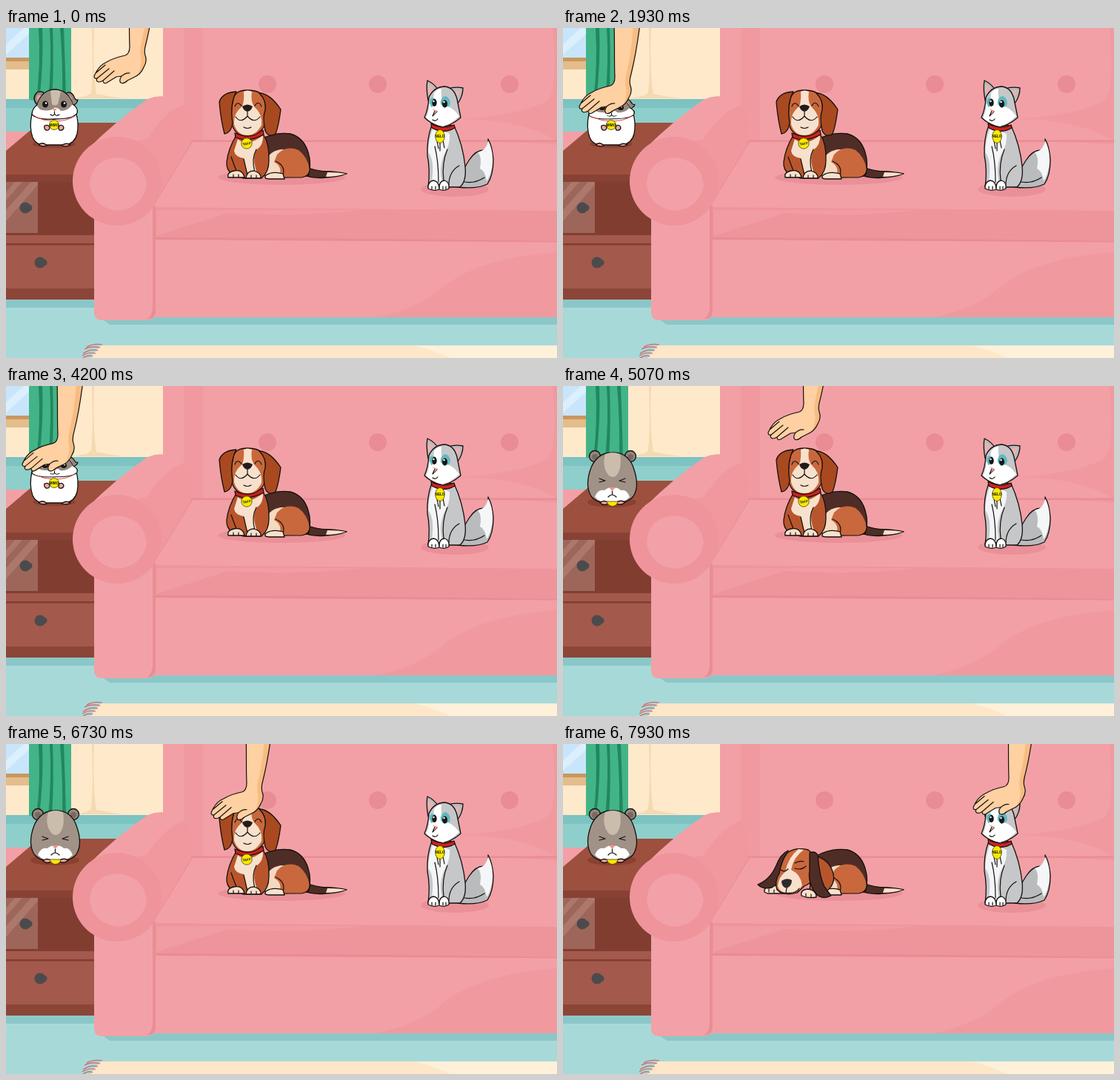
These frames come from a looping animation (744 by 446 pixels, 8000 ms). An HTML page:

```html
<!DOCTYPE html>
<html lang="en">
<head>
<meta charset="utf-8">
<title>Petting the pets</title>
<style>
  html, body { margin: 0; width: 100%; height: 100%; overflow: hidden; background: #f2a0a6; }
  svg { display: block; width: 744px; height: 446px; }
  .ink { stroke: #15100e; stroke-width: 1.3; stroke-linejoin: round; stroke-linecap: round; }
  .line { fill: none; stroke: #15100e; stroke-width: 1.2; stroke-linecap: round; stroke-linejoin: round; }
  .tag { fill: #f9e900; stroke: #4a4300; stroke-width: .8; }
  text { font: 700 4.6px "Liberation Sans", Arial, sans-serif; text-anchor: middle; fill: #111; }
  .off { display: none; }
</style>
</head>
<body>
<svg viewBox="0 0 744 446">
  <!-- wall, window, curtain -->
  <g id="room">
    <path fill="#ffe9cb" d="M0 0H230V100H0z"/>
    <path fill="#c9e5fb" d="M0 0H31V40H0z"/>
    <path fill="#dceffd" d="M0 22L24 0H31V8L0 36z"/>
    <path fill="#c8975f" d="M0 40H32V45H0z"/>
    <path fill="#e3bd8b" d="M0 45H32V56H0z"/>
    <path fill="#ffe9cb" d="M0 56H28V96H0z"/>
    <path fill="#f4d9b1" d="M116 0H119Q117 60 122 89Q140 93 160 95H88Q112 93 115 87Q118 60 116 0z"/>
    <path fill="#8ecfcb" d="M0 96H240V140H0z"/>
    <path fill="#7cc3c2" d="M0 96H240V108H0z"/>
    <path fill="#43b488" d="M31 0H88V97Q60 101 31 97z"/>
    <path fill="#21875f" d="M44 0H49Q51 45 45 98H41Q47 50 44 0zM59 0H63Q65 50 62 98H57Q62 45 59 0zM73 0H78Q80 50 81 98H76Q77 50 73 0z"/>
    <path fill="#a8d9d9" d="M0 366H744V446H0z"/>
    <path fill="#8bc7c8" d="M0 366H125V378H0zM125 390H744V401H140z"/>
    <path fill="#fde7c8" d="M128 429H744V446H114Q120 438 128 429z"/>
    <path fill="#fff0da" d="M552 429H744V446H600Q578 436 552 429z"/>
    <path fill="none" stroke="#d86462" stroke-width="1.2" d="M130 428Q118 426 109 431M127 432Q115 429 106 434M124 436Q114 433 104 440M121 440Q112 437 103 443M117 444Q111 441 104 446"/>
  </g>

  <!-- side table -->
  <g id="table">
    <path fill="#a3594b" d="M0 200H122V367H0z"/>
    <path fill="#9c503d" d="M45 128H152L110 207H0V166z"/>
    <path fill="#884235" d="M0 198H122V208H0z"/>
    <path fill="#813d30" d="M43 208H122V277H43z"/>
    <path fill="#9e665a" d="M0 208H43V277H0z"/>
    <path fill="#ac786c" d="M0 246L34 208H43V212L0 261zM0 222L12 208H22L0 233z"/>
    <path fill="#823e32" d="M0 277H122V280H0zM0 291H122V293.500H0z"/>
    <path fill="#8c4638" d="M0 352H122V367H0z"/>
    <g fill="#4b4b4d">
      <circle cx="26" cy="243" r="7.500"/><circle cx="31" cy="243" r="4.500"/>
      <circle cx="46" cy="317" r="7.500"/><circle cx="51" cy="317" r="4.500"/>
    </g>
  </g>

  <!-- sofa -->
  <g id="sofa">
    <path fill="#f2a0a6" d="M212 0H744V391H190V150H212z"/>
    <path fill="#f09a9f" d="M240 0H266V153H240z"/>
    <path fill="#f09a9f" d="M744 0H738Q746 92 728 100Q690 118 610 123Q700 124 744 153z"/>
    <path fill="#ea8d95" d="M250 151.500H744V154H252L207 228L200 238z"/>
    <path fill="#f2a0a6" d="M254 154H744V247L203 243z"/>
    <path fill="#ef999e" d="M744 158Q700 154 660 154H744z"/>
    <path fill="#ee959b" d="M202 242L744 247V288L202 284z"/>
    <path fill="#f09ca2" d="M203 281L300 250Q400 256 480 246H203z"/>
    <path fill="#e98b93" d="M202 283Q480 284 744 288V289.500Q480 288 202 286z"/>
    <path fill="#f09a9f" d="M744 303Q640 310 590 350Q560 378 500 391H744z"/>
    <g fill="#e98c94">
      <circle cx="353" cy="76" r="12"/><circle cx="502" cy="76" r="12"/><circle cx="680" cy="76" r="12"/>
    </g>
    <path fill="#f0989e" d="M104 172Q150 125 190 97Q205 90 222 94Q250 103 250 130V155L200 238z"/>
    <path fill="#f2a0a6" d="M110 164Q150 124 190 97Q205 90 222 94Q234 98 240 104Q215 112 190 150z"/>
    <path fill="#f2a1a8" d="M119 220H202V384Q202 394 190 395H130Q119 395 119 384z"/>
    <path fill="#ea8d95" d="M198 240H202V384Q201 394 190 393Q197 391 198 378z"/>
    <circle cx="150" cy="207" r="60" fill="#ef949b"/>
    <path fill="#f2a1a8" d="M113 213Q114 178 150 175Q186 178 190 212Q184 244 150 247Q118 242 113 213z"/>
  </g>

  <!-- hamster -->
  <g id="hamsterUp">
    <ellipse cx="65" cy="157" rx="29" ry="5" fill="#8c4030"/>
    <path class="ink" fill="#fff" d="M35 116Q31 134 36 148Q40 158 52 158H80Q93 156 96 143Q99 128 94 113z"/>
    <g id="hamsterHead">
      <path class="ink" fill="#95877c" d="M42 104Q34 95 42 87Q49 84 52 89zM80 89Q86 84 91 91Q94 99 97 97Q96 104 87 106z"/>
      <path fill="#d9a3a0" d="M43 99Q39 93 44 90Q48 90 48 93zM83 92Q87 89 89 96L86 100z"/>
      <path class="ink" fill="#fff" d="M42 104Q48 84 66 83Q84 84 90 103Q98 108 96 115Q91 123 67 123Q43 125 35 117Q35 109 42 104z"/>
      <path fill="#95877c" d="M42 105Q48 85 66 84Q84 85 90 103Q84 112 74 112Q70 107 65 108Q60 113 50 111Q45 111 42 105z"/>
      <path fill="#cbbdac" d="M60 85Q67 82 74 86L70 103Q66 106 62 103z"/>
      <ellipse cx="53" cy="103" rx="4" ry="4.500" fill="#1b1514"/><ellipse cx="78" cy="103" rx="4" ry="4.500" fill="#1b1514"/>
      <circle cx="54" cy="101.500" r="1.200" fill="#fff"/><circle cx="79" cy="101.500" r="1.200" fill="#fff"/>
      <path fill="#f2928d" d="M62 109H69L65.500 113z"/>
      <path class="line" d="M65.500 113V116M60 117Q64 120 65.500 116Q68 120 72 117"/>
    </g>
    <path fill="none" stroke="#e04a3d" d="M39 120Q52 126 65 126Q82 126 93 119"/>
    <circle class="tag" cx="65" cy="131" r="6.500"/>
    <text x="65" y="132.700">MIMO</text>
    <path class="ink" fill="#f3aaa0" stroke-width=".8" d="M52 132Q57 130 59 134Q59 139 54 138Q51 136 52 132zM72 132Q77 130 78 135Q77 139 72 138Q70 135 72 132z"/>
    <path class="ink" fill="#f3aaa0" d="M44 158Q50 153 55 159Q50 161 44 158zM75 159Q81 154 87 158Q82 161 75 159z"/>
  </g>
  <g id="hamsterDown" class="off">
    <ellipse cx="66" cy="157" rx="33" ry="7" fill="#8c4030"/>
    <circle class="ink" cx="43" cy="95" r="7.500" fill="#95877c"/><circle class="ink" cx="91" cy="95" r="7.500" fill="#95877c"/>
    <circle cx="43" cy="96" r="4" fill="#786a61"/><circle cx="91" cy="96" r="4" fill="#786a61"/>
    <path class="ink" fill="#a09287" d="M66 90Q87 89 95 110Q104 135 95 149Q87 159 66 159Q46 159 38 149Q29 134 38 110Q47 90 66 90z"/>
    <path fill="#cbbdac" d="M57 92Q67 88 77 92Q80 112 72 121Q67 125 62 121Q52 110 57 92z"/>
    <path fill="#fff" d="M43 150Q47 139 56 141Q63 135 67 139Q72 135 78 141Q86 139 90 150Q83 158 66 158Q50 158 43 150z"/>
    <path class="line" d="M49 125L57 128L49 130M84 125L76 128L84 130" stroke-width=".9"/>
    <path fill="#f2928d" d="M62 137H71L66.500 142z"/>
    <path class="line" d="M66.500 142V147M61 150Q66 144 72 150"/>
    <path class="ink" fill="#f3aaa0" d="M50 158Q55 153 62 158Q56 163 50 158zM71 158Q77 153 84 157Q78 163 71 158z"/>
    <path class="tag" d="M59 156H74Q73 162 66.500 162.500Q61 162 59 156z"/>
  </g>

  <!-- dog -->
  <g id="dog">
    <ellipse cx="372" cy="202" rx="86" ry="10" fill="#ea9098"/>
    <path class="ink" fill="#4f2d27" d="M404 187Q418 194 438 194Q451 195 460 197Q447 202 432 202Q414 204 400 198z"/>
    <path fill="#f8e1cc" d="M434 195Q450 195 459 197Q446 201 432 201z"/>
    <path class="ink" fill="#4f2d27" d="M340 152Q363 140 384 143Q402 148 408 168Q413 184 408 200L352 203Q338 180 340 152z"/>
    <path fill="#f5d9c0" d="M348 182Q358 163 376 164L372 201L350 202z"/>
    <path fill="#c9683c" d="M366 171Q378 158 395 165Q407 174 410 191Q408 202 396 202L368 203Q375 188 362 181z"/>
    <path class="line" d="M364 180Q378 186 374 200M410 187Q412 200 399 202H355"/>
    <path class="ink" fill="#f8e1cc" d="M374 197Q360 193 351 199Q347 204 356 204H376z"/>
    <g id="dogUp">
      <path class="ink" fill="#b9552c" d="M311 145Q300 163 298 181Q297 192 306 198L320 203H345Q355 195 355 179Q356 157 347 143z"/>
      <path fill="#f8e1cc" d="M313 150Q326 162 347 145Q348 158 338 165Q331 178 341 201H327L321 176Q309 174 308 166z"/>
      <path class="line" d="M304 174Q308 186 312 195M321 177L326 199M338 164Q331 177 336 195"/>
      <path class="ink" fill="#f8e1cc" d="M300 202Q298 195 308 193Q320 191 322 202zM324 203Q325 193 335 193Q345 196 344 203z"/>
      <path class="line" d="M307 198V202M314 198V202M331 199V203M338 199V203" stroke-width=".8"/>
      <path class="ink" fill="#c9211e" d="M309 142Q326 150 347 138L348 144Q328 155 310 148z"/>
      <path class="ink" fill="#c9683c" d="M307 96Q309 84 326 84Q344 84 349 95Q353 116 348 134Q339 147 325 146Q311 146 306 133Q302 116 307 96z"/>
      <path fill="#f8e1cc" d="M321 86Q326 83 332 86Q330 99 335 106Q347 117 345 131Q338 145 325 145Q312 144 308 130Q307 115 319 106Q322 98 321 86z"/>
      <path class="ink" fill="#a9491f" d="M311 86Q292 87 288 100Q290 124 295 143Q304 142 306 128Q302 102 311 86zM342 88Q356 88 371 110Q368 133 364 143Q355 149 350 139Q346 120 350 111Q352 98 342 88z"/>
      <path class="line" d="M309 106Q312 98 318 105M336 105Q341 97 345 106" stroke-width="1.600"/>
      <path fill="#241b1b" d="M319 106Q326 101 333 106Q331 112 326 113Q321 112 319 106z"/>
      <path class="line" d="M326 113V119M310 120Q317 130 326 119Q335 130 343 120" stroke-width="1.700"/>
      <path class="line" d="M321 134Q326 137 331 134" stroke-width=".8"/>
      <circle class="tag" cx="325" cy="156" r="7.200"/>
      <text x="325" y="158" transform="rotate(-8 325 156)">TAFF</text>
    </g>
    <g id="dogDown" class="off">
      <path class="ink" fill="#b9552c" d="M336 150Q358 154 364 172Q370 190 353 201L333 202z"/>
      <path class="ink" fill="#f8e1cc" d="M272 200Q271 192 283 190L300 193V202H276z"/>
      <path class="ink" fill="#4f2d27" d="M304 144Q294 148 288 164Q280 183 263 190Q270 197 282 194Q297 186 301 170z"/>
      <path class="ink" fill="#c9683c" d="M303 147Q314 139 331 143Q342 151 341 169Q340 187 326 192L316 201Q300 206 289 197Q285 187 292 175Q295 157 303 147z"/>
      <path fill="#f8e1cc" d="M318 142L325 143Q311 153 308 170Q321 176 323 191Q318 201 305 202Q292 201 290 192Q291 180 300 173Q304 153 318 142z"/>
      <path class="line" d="M294 170Q299 174 304 169M313 168Q322 171 328 165M313 161Q320 157 325 159" stroke-width="1.500"/>
      <path fill="#30292b" d="M295 185Q302 180 309 184Q309 192 302 195Q295 193 295 185z"/>
      <path class="line" d="M302 195L301 201M289 196Q293 203 301 201Q314 203 319 195"/>
      <path class="ink" fill="#f8e1cc" d="M322 205Q320 197 331 196Q343 198 342 207Q331 209 322 205z"/>
      <path class="line" d="M328 202V206M335 203V207M278 196V200M285 197V201" stroke-width=".8"/>
      <path class="ink" fill="#4f2d27" d="M333 147Q340 144 344 150Q346 178 353 193Q359 201 362 205Q351 211 342 203Q330 187 333 171z"/>
    </g>
  </g>

  <!-- cat -->
  <g id="cat">
    <ellipse cx="606" cy="218" rx="46" ry="10" fill="#ea9098"/>
    <path class="ink" fill="#b9bbbd" d="M608 213Q616 193 625 179Q634 165 645 165Q652 160 651 150Q657 161 658 178Q658 199 650 211Q635 218 610 215z"/>
    <path fill="#f5f6f7" d="M651 152Q658 166 657 183Q654 201 649 207Q647 193 640 190Q643 174 637 168Q648 166 651 152z"/>
    <path class="line" d="M615 207Q631 212 646 202"/>
    <path class="ink" fill="#c5c7c9" d="M575 131Q568 150 569 172Q573 192 570 215H613Q622 207 620 187Q617 158 605 132z"/>
    <path fill="#f4f5f6" d="M577 134Q570 153 570 168Q579 178 575 207L590 213Q583 190 592 170Q600 158 599 143z"/>
    <path class="line" d="M579 160Q584 180 584 208M596 164Q588 183 591 207M612 186Q598 194 598 212M582 153L584 163M586 155V166M590 152L592 162"/>
    <path class="ink" fill="#fff" d="M570 217Q569 208 577 206Q585 207 585 218Q578 221 570 217zM585 218Q584 207 592 206Q599 208 598 217Q592 221 585 218z"/>
    <path class="line" d="M575 214V218M580 214V218M590 214V218M594 214V218" stroke-width=".8"/>
    <path class="ink" fill="#d3201f" d="M574 129Q589 138 605 131L606 135Q591 144 575 135z"/>
    <path class="ink" fill="#b9bbbd" d="M570 98Q567 82 569 71Q578 75 584 84zM597 82Q606 79 617 81Q617 92 610 102z"/>
    <path fill="#e8b3b0" d="M571 91Q570 82 571 76Q576 79 579 84zM604 85L613 84Q613 91 608 95z"/>
    <path class="ink" fill="#c5c7c9" d="M571 94Q577 80 592 79Q605 80 609 96L614 121Q608 126 604 128Q594 135 583 132Q572 128 565 121Q570 110 571 94z"/>
    <path fill="#fff" d="M578 88Q582 82 588 82Q586 95 593 106Q603 106 612 119Q601 130 590 133Q577 131 567 121Q572 112 571 103Q577 103 578 88z"/>
    <path fill="#60b9bf" d="M572 100Q573 91 580 96L581 104L574 107zM587 103Q586 93 594 92Q602 96 599 105L592 108z"/>
    <ellipse cx="578.500" cy="101" rx="3.200" ry="5" fill="#171719"/><ellipse cx="592.500" cy="102.500" rx="3.500" ry="5" fill="#171719"/>
    <circle cx="577.500" cy="99" r="1.200" fill="#fff"/><circle cx="591.500" cy="100" r="1.300" fill="#fff"/>
    <path class="line" d="M579 112L576 119L582 113M576 124Q580 127 583 123" stroke-width=".9"/>
    <path fill="#ee8c82" d="M575 109L583 112L577 118L580 113z"/>
    <ellipse class="tag" cx="586" cy="146.500" rx="6.300" ry="9"/>
    <text x="586" y="148">NELO</text>
  </g>

  <!-- hand, drawn at its lowest stroke over the hamster -->
  <g id="hand">
    <path fill="#ffd0a1" d="M69 -6C70 25 69 45 70 66Q70 76 64 78Q49 81 39 87Q30 91 25 100L22 106Q22 110 26 109Q24 113 28 114Q31 114 34 112Q34 117 39 115L52 107L59 106Q55 112 58 115Q62 117 67 112L75 108Q85 104 89 94Q94 86 91 78Q89 72 92 62Q99 34 104 -6z"/>
    <path fill="#f8bc82" d="M104 -6Q99 34 92 62Q89 72 91 78Q94 86 89 94Q87 100 81 104Q87 91 85 81Q83 72 86 60Q93 30 95 -6z"/>
    <path class="line" stroke-width="1.500" d="M69 -6C70 25 69 45 70 66Q70 76 64 78Q49 81 39 87Q30 91 25 100L22 106Q22 110 26 109L42 96M26 109Q24 113 28 114Q31 114 34 112L49 99M34 112Q34 117 39 115L52 107L59 106M24 102L37 91M59 106Q55 112 58 115Q62 117 67 112L75 108Q85 104 89 94Q94 86 91 78Q89 72 92 62Q99 34 104 -6M59 106Q65 101 70 102"/>
  </g>
</svg>
<script>
  const LOOP = 8000, FPS = 15, STROKE = 1155, LIFT = 31;
  const $ = id => document.getElementById(id);

  // start of each stop, its offset, and a moment when the hand is highest
  const stops = [
    { from: 0, x: 97, y: -41 },
    { from: 1330, x: 0, y: 0, top: 1365 },
    { from: 4930, x: 255, y: -12, top: 5075 },
    { from: 7465, x: 532, y: -16, top: 7500 }
  ];

  const show = (id, on) => $(id).classList.toggle('off', !on);

  function pose(t) {
    const i = stops.findLastIndex(s => t >= s.from);
    const { x, y, top } = stops[i];
    const lift = i ? LIFT / 2 * (1 + Math.cos((t - top) / STROKE * 2 * Math.PI)) : 0;
    $('hand').setAttribute('transform', `translate(${x} ${(y - lift).toFixed(2)})`);

    // the hamster's head gives way under the palm
    const press = i === 1 ? Math.max(0, 1 - lift / 16) : 0;
    $('hamsterHead').setAttribute('transform', `translate(0 122) scale(1 ${1 - .25 * press}) translate(0 -122)`);

    show('hamsterUp', i < 2);
    show('hamsterDown', i >= 2);
    show('dogUp', i < 3);
    show('dogDown', i >= 3);
  }

  function frame() {
    const tick = Math.floor((performance.now() % LOOP + 4) * FPS / 1000);
    pose(tick % (LOOP * FPS / 1000) * 1000 / FPS);
    requestAnimationFrame(frame);
  }
  frame();
</script>
</body>
</html>
```
